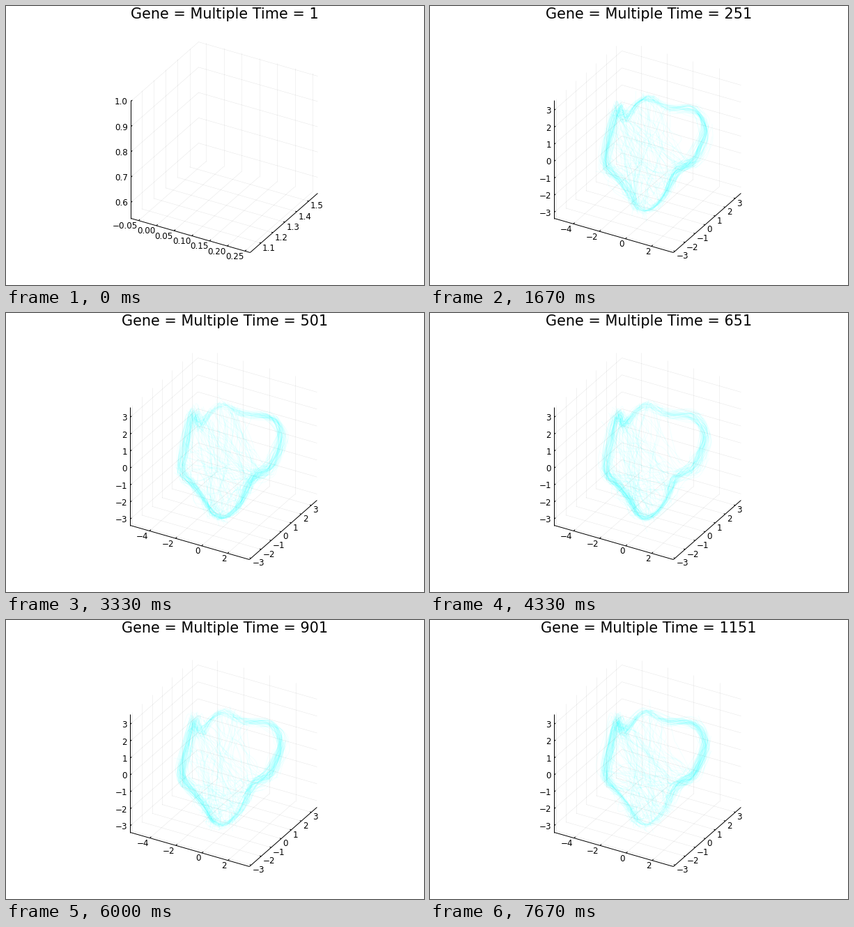
Recreate the animation shown at these times as a matplotlib script. Size 600 by 400 pixels, loop 8 s.

```python
import numpy as np
import matplotlib.pyplot as plt
from matplotlib.animation import FuncAnimation
from matplotlib.collections import LineCollection

W, H, DPI = 600, 400, 100
POSES, TICKS, TICK_MS = 24, 80, 100
PX = 72 / DPI  # points per pixel

fig = plt.figure(figsize=(W / DPI, H / DPI), dpi=DPI, facecolor="white")
ax = fig.add_axes([0, 0, 1, 1])

# Edge vectors of the projected box, in pixels
EX, EY, EZ = np.array([171, 49]), np.array([97, -85]), np.array([0, -170])

# Key points of the closed path that all trajectories follow
LOOP = np.array([(250, 224), (259, 185), (269, 139), (277, 164), (292, 143),
                 (314, 129), (340, 148), (377, 145), (396, 174), (386, 203),
                 (375, 226), (352, 234), (341, 265), (318, 292), (298, 290),
                 (286, 268), (265, 240)], float)
N = len(LOOP)


def catmull_rom(a, b, c, d, t):
    return .5 * (2 * b + (c - a) * t + (2 * a - 5 * b + 4 * c - d) * t ** 2
                 + (3 * b - a - 3 * c + d) * t ** 3)


def on_loop(phase):
    """Points of the closed path; one unit of phase per key point."""
    phase = np.asarray(phase, float)
    i = np.floor(phase).astype(int)
    corners = [LOOP[(i + k) % N] for k in (-1, 0, 1, 2)]
    return catmull_rom(*corners, (phase - i)[..., None])


def smooth(points, steps=7):
    """Open smooth curve through the points."""
    p = np.vstack([2 * points[0] - points[1], points,
                   2 * points[-1] - points[-2]])
    t = np.linspace(0, 1, steps, endpoint=False)[:, None]
    pieces = [catmull_rom(*p[i:i + 4], t) for i in range(len(p) - 3)]
    return np.vstack(pieces + [points[-1:]])


def wall(phase):
    """1 on the dense left and right sides, 0 on the arc and the lobe."""
    return np.cos(2 * np.pi * (phase - 1) / N) ** 2


def strands(pose):
    rng = np.random.default_rng(500 + pose)
    chance = (.35 + wall(np.arange(N))) * rng.uniform(.7, 1.3, N)
    curves = []
    for middle in rng.choice(N, 290, p=chance / chance.sum()):
        count = rng.integers(3, 6)
        phase = (middle + rng.uniform(-.5, .5)
                 + np.arange(count) - (count - 1) / 2)
        spread = 1.8 + 2.2 * wall(phase)[:, None]
        noise = rng.normal(0, 1, 2) + .6 * rng.normal(0, 1, (count, 2))
        curves.append(smooth(on_loop(phase) + spread * noise))
    # Chords across the inside
    along = np.linspace(0, 1, 5)[:, None]
    for _ in range(rng.integers(105, 140)):
        start, end = on_loop([rng.uniform(-3, 6), rng.uniform(10, 15)])
        points = start + (end - start) * along
        curves.append(smooth(points + rng.normal(0, 6, points.shape)))
    return curves


def scale(pose):
    """Ticks per axis as (fraction along the edge, label)."""
    if pose == 0:
        xs = [(.064 + .1488 * i, f"{-.05 + .05 * i:.2f}") for i in range(7)]
        ys = [(.16 + .1768 * i, f"{1.1 + .1 * i:.1f}") for i in range(5)]
        zs = [(.135 + .2132 * i, f"{.6 + .1 * i:.1f}") for i in range(5)]
    else:
        drift = .008 * pose / POSES  # the limits creep outwards
        xs = [(.158 + drift + .2185 * i, f"{2 * i - 4}") for i in range(4)]
        ys = [(.022 + drift / 2 + .1485 * i, f"{i - 3}") for i in range(7)]
        zs = [(.912 - (.1437 - drift / 6) * (6 - i), f"{i - 3}")
              for i in range(7)]
    return xs, ys, zs


def label(pos, text, ha):
    ax.text(*pos, text.replace("-", "\u2212"), ha=ha, va="baseline",
            fontsize=11.85 * PX, family="DejaVu Sans", zorder=5)


def draw_box(pose):
    origin = np.array([178.9 if pose == 0 else 177.9, 304])
    xs, ys, zs = scale(pose)
    front, back = origin + EX, origin + EY
    grid, axes = [], [(origin, origin + EZ), (origin, front),
                      (front, front + EY)]
    for f, text in xs:
        tick = origin + f * EX
        far = tick + EY
        grid += [(tick, far), (far, far + EZ)]
        axes.append((tick, tick + .02 * EY))
        label(tick + (-1.5, 11.5), text, "right")
    for f, text in ys:
        tick, left = front + f * EY, origin + f * EY
        grid += [(tick, left), (left, left + EZ)]
        axes.append((tick, tick - .012 * EX))
        label(tick + (2.2, 10.7), text, "left")
    for f, text in zs:
        tick = origin + f * EZ
        far = back + f * EZ
        grid += [(tick, far), (far, far + EX)]
        axes.append((tick, tick + .02 * EY))
        label(tick + (-4.5, 4.8), text, "right")
    ax.add_collection(LineCollection(grid, colors="black", alpha=.1,
                                     linewidths=.5 * PX, zorder=1))
    ax.add_collection(LineCollection(axes, colors="black",
                                     linewidths=PX, zorder=4))


def draw(pose):
    ax.clear()
    ax.axis("off")
    ax.set_xlim(-.5, W - .5)
    ax.set_ylim(H - .5, -.5)
    draw_box(pose)
    if pose:
        ax.add_collection(LineCollection(strands(pose), colors="cyan",
                                         alpha=.05, linewidths=PX, zorder=2))
    ax.text(313.5, 18, f"Gene = Multiple Time = {1 + 50 * pose}",
            ha="center", va="baseline", fontsize=20.8 * PX,
            family="DejaVu Sans", zorder=5)


def pose_at(tick):
    """The pose that begins before this tick ends."""
    return ((tick + 1) * POSES - 1) // TICKS


def update(tick):
    if tick == 0 or pose_at(tick) != pose_at(tick - 1):
        draw(pose_at(tick))
    return []


anim = FuncAnimation(fig, update, frames=TICKS, interval=TICK_MS,
                     init_func=lambda: draw(0), repeat=True, repeat_delay=0)
plt.show()
```
